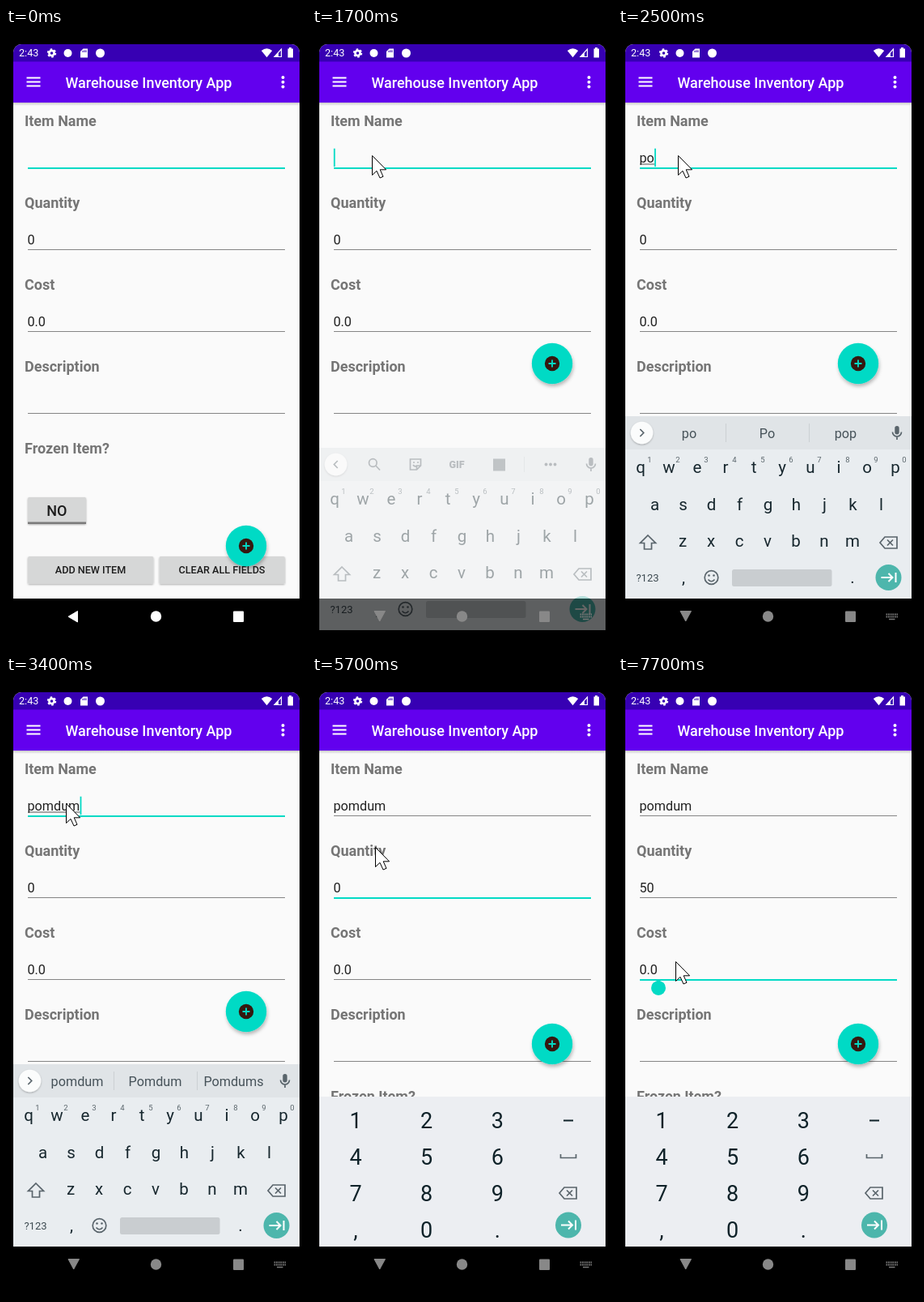
Animation, 371 px wide and 765 px high, one loop 8 s. Source, as an HTML page:

```html
<!DOCTYPE html>
<html lang="en">
<head>
<meta charset="utf-8">
<title>Inventory form</title>
<style>
  html, body { margin: 0; width: 100%; height: 100%; overflow: hidden; background: #000; }
  svg { display: block; width: 371px; height: 765px; font-family: Roboto, sans-serif; }
  .label { font-size: 18px; font-weight: 700; fill: #757575; }
  .value { font-size: 16.2px; fill: #212121; }
  .button { font-size: 12.6px; font-weight: 500; fill: #1c1c1c; }
  .mid { text-anchor: middle; }
  .key { font-size: 20.5px; fill: #17272e; }
  .hint { font-size: 9.5px; fill: #5c676d; }
  .digit { font-size: 27px; fill: #0f2229; }
  .word { font-size: 16.2px; fill: #465259; }
  .line { fill: none; stroke: #59646b; stroke-width: 1.7; }
</style>
</head>
<body>
<svg viewBox="0 0 371 765">
  <defs>
    <clipPath id="screen"><path d="M9 704V30a10 10 0 0 1 10-10H353a10 10 0 0 1 10 10V704Z"/></clipPath>
    <linearGradient id="fade" x2="0" y2="1">
      <stop stop-color="#000" stop-opacity=".2"/><stop offset="1" stop-color="#000" stop-opacity="0"/>
    </linearGradient>
    <filter id="lift" x="-30%" y="-30%" width="160%" height="170%">
      <feDropShadow dx="1" dy="3" stdDeviation="2" flood-opacity=".27"/>
    </filter>
    <filter id="low" x="-10%" y="-20%" width="120%" height="150%">
      <feDropShadow dx="0" dy="1" stdDeviation=".8" flood-opacity=".3"/>
    </filter>
    <g id="erase">
      <path class="line" d="M-11 0L-5-7H10V7H-5Z M-2-3.5L5 3.5M5-3.5L-2 3.5"/>
    </g>
    <g id="next">
      <circle r="16" fill="#4db6ac"/>
      <path d="M-9 0H5M0-5L5 0L0 5M9-6V6" fill="none" stroke="#fff" stroke-width="2"/>
    </g>
  </defs>

  <g clip-path="url(#screen)">
    <rect x="9" y="20" width="354" height="684" fill="#fafafa"/>
    <g id="form">
      <g id="fields"></g>
      <text class="label" x="23" y="525" id="frozen">Frozen Item?</text>
      <g id="actions">
        <rect x="27" y="579" width="72" height="33" rx="1.5" fill="#d6d7d7" filter="url(#low)"/>
        <rect x="27" y="609.5" width="72" height="2.5" fill="#7b7b7b"/>
        <text class="mid" x="62.8" y="602" font-size="18" font-weight="500" fill="#1c1c1c">NO</text>
        <g fill="#d6d7d7" filter="url(#low)">
          <rect x="27" y="652" width="155.5" height="34" rx="2"/>
          <rect x="189.500" y="652" width="155.5" height="34" rx="2"/>
        </g>
        <text class="button mid" x="104.5" y="673">ADD NEW ITEM</text>
        <text class="button mid" x="267" y="673">CLEAR ALL FIELDS</text>
      </g>
    </g>
    <path id="handle" d="M50 375L56.400 378.600A9 9 0 1 1 43.600 378.600Z" fill="#03dac5"/>
    <rect id="caret" width="1.8" height="22.5" fill="#03dac5"/>
    <g id="fab">
      <circle r="25.2" fill="#03dac5" filter="url(#lift)"/>
      <circle r="9.2" fill="#35180f"/>
      <path d="M-4.500 0H4.500M0-4.500V4.500" stroke="#03dac5" stroke-width="1.900"/>
    </g>

    <rect x="9" y="92" width="354" height="4" fill="url(#fade)"/>
    <rect x="9" y="41" width="354" height="51" fill="#6200ee"/>
    <rect x="9" y="20" width="354" height="21.500" fill="#3700b3"/>
    <g fill="#fff">
      <text x="16" y="35.300" font-size="12.600">2:43</text>
      <circle cx="56.500" cy="31" r="3.100" fill="none" stroke="#fff" stroke-width="2.600"/>
      <circle cx="56.500" cy="31" r="4.700" fill="none" stroke="#fff" stroke-width="2" stroke-dasharray="2.461"/>
      <circle cx="76.500" cy="31" r="5"/>
      <path d="M92 29L95.500 25.500H101V36.500H92Z"/>
      <path d="M95 27.800V30M97 27.300V30M99 27.300V30" stroke="#3700b3"/>
      <circle cx="116.500" cy="31" r="5.500"/>
      <path d="M315.800 28Q322.500 22.500 329.200 28L322.500 36.300Z"/>
      <path d="M332 35.500L340.500 26V35.500Z" fill="none" stroke="#fff" stroke-width="1.200"/>
      <path d="M331.500 36L337 30V36Z"/>
      <path d="M348.500 26V25.500H350V24H353V25.500H355V36.500H348.500Z"/>
      <path d="M25.500 60.500h17v2h-17zM25.500 65.500h17v2h-17zM25.500 70.500h17v2h-17z"/>
      <text x="73.500" y="74" font-size="18" font-weight="500">Warehouse Inventory App</text>
      <circle cx="342.500" cy="61" r="2"/><circle cx="342.500" cy="66.700" r="2"/><circle cx="342.500" cy="72.400" r="2"/>
    </g>
  </g>

  <g id="letters">
    <rect x="9" y="479" width="354" height="225" fill="#e9edf0"/>
    <rect x="9" y="479" width="354" height="41" fill="#e0e4e7"/>
    <circle cx="29.500" cy="499.500" r="13.800" fill="#fbfcfc" filter="url(#low)"/>
    <path id="chevron" class="line" d="M2.200-4.500L-2.200 0L2.200 4.500"/>
    <g id="tools">
      <circle class="line" cx="75.300" cy="497.500" r="4.800"/>
      <path class="line" d="M78.800 501L84 506.500"/>
      <path class="line" d="M121.500 493h13v8l-5 5h-8zM134.500 501h-5v5M125 500q2 3 5 1"/>
      <circle cx="126" cy="497" r="1" fill="#59646b"/><circle cx="131" cy="497" r="1" fill="#59646b"/>
      <text class="mid" x="179" y="504" font-size="12.500" font-weight="900" fill="#59646b">GIF</text>
      <rect x="224" y="492.500" width="15" height="15" fill="#6a757b"/>
      <path d="M262.500 490V509" stroke="#c5cbcf"/>
      <g fill="#59646b"><circle cx="289.500" cy="499.500" r="1.900"/><circle cx="295" cy="499.500" r="1.900"/><circle cx="300.500" cy="499.500" r="1.900"/></g>
    </g>
    <g id="words">
      <path d="M133.500 488V511M236.500 488V511" stroke="#cbd0d3"/>
      <text class="word mid" x="88" y="505.500"></text>
      <text class="word mid" x="184.500" y="505.500"></text>
      <text class="word mid" x="281.500" y="505.500"></text>
    </g>
    <rect x="342.300" y="491" width="5.400" height="10.500" rx="2.700" fill="#59646b"/>
    <path class="line" d="M339.500 498.500a5.500 5.500 0 0 0 11 0M345 504V508"/>
    <g id="keys"></g>
    <path class="line" d="M37 626L46.500 635.500H41.500V643H32.500V635.500H27.500Z"/>
    <use href="#erase" x="335" y="635"/>
    <text class="mid" x="36.500" y="683" font-size="13" fill="#3d4a51">?123</text>
    <text class="key mid" x="81" y="685">,</text>
    <circle class="line" cx="115.500" cy="678" r="8.300"/>
    <path class="line" d="M111.500 680.500q4 4.500 8 0"/>
    <circle cx="112.500" cy="675.500" r="1.300" fill="#59646b"/><circle cx="118.500" cy="675.500" r="1.300" fill="#59646b"/>
    <rect x="141" y="668" width="123.500" height="21" rx="2.500" fill="#c9cdd0"/>
    <text class="key mid" x="290" y="685">.</text>
    <use href="#next" x="334.500" y="678"/>
  </g>

  <g id="numbers">
    <rect x="9" y="519" width="354" height="185" fill="#eceef2"/>
    <g id="pad"></g>
    <path d="M311 548.500H323" stroke="#0f2229" stroke-width="2"/>
    <path class="line" d="M307.500 590V594.500H326.500V590"/>
    <use href="#erase" x="317" y="638"/>
    <use href="#next" x="317" y="677.500"/>
  </g>

  <g id="nav">
    <path id="back" d="M77 726.300L88.500 719.500V733Z" stroke-width="1" stroke-linejoin="round"/>
    <path id="down" d="M77 719.500H90.500L83.700 732Z" stroke-width="1" stroke-linejoin="round"/>
    <circle cx="185.500" cy="726" r="6.700"/>
    <rect x="281" y="719.500" width="13" height="13.500" rx="1"/>
    <g id="switch">
      <path d="M331.500 723.500H346M331.500 726.500H346" stroke="#777" stroke-width="1.800" stroke-dasharray="1.800 .8"/>
      <path d="M335 729.500H342.500" stroke="#777" stroke-width="1.500"/>
    </g>
  </g>

  <path id="mouse" d="M.5.5V24.500L6 19.300L10 28L14 26.300L10.200 17.800H17.600Z" fill="#fff" stroke="#000"/>
</svg>
<script>
const LOOP = 8000;
const $ = id => document.getElementById(id);
const make = (parent, tag, attrs, text = '') => {
  const el = document.createElementNS('http://www.w3.org/2000/svg', tag);
  for (const name in attrs) el.setAttribute(name, attrs[name]);
  el.textContent = text;
  return parent.appendChild(el);
};
const show = (el, on) => el.setAttribute('visibility', on ? 'visible' : 'hidden');
const move = (el, x, y) => el.setAttribute('transform', `translate(${x} ${y})`);

// Each row holds from its start time until the next one.
const at = (steps, t) => steps.reduce((row, next) => next[0] <= t ? next : row);

const fields = ['Item Name', 'Quantity', 'Cost', 'Description'].map((name, i) => {
  const y = 101 * i, box = $('fields');
  make(box, 'text', { class: 'label', x: 23, y: 121 + y }, name);
  return {
    line: make(box, 'rect', { x: 27, y: 172 + y, width: 318 }),
    value: make(box, 'text', { class: 'value', x: 26.5, y: 166 + y })
  };
});
const compose = make($('fields'), 'rect', { x: 27, y: 167.5, height: 1, fill: '#555' });

[['qwertyuiop', 28, 549], ['asdfghjkl', 45.5, 595], ['zxcvbnm', 80, 640]].forEach(([row, x, y], r) => {
  [...row].forEach((key, i) => {
    make($('keys'), 'text', { class: 'key mid', x: x + 35 * i, y }, key);
    if (!r) make($('keys'), 'text', { class: 'hint mid', x: x + 11 + 35 * i, y: 535.5 }, (i + 1) % 10);
  });
});
[...'123456789,0.'].forEach((key, i) => make($('pad'), 'text', {
  class: 'digit mid', x: 54 + 87.7 * (i % 3), y: 558 + 45 * Math.floor(i / 3)
}, key));
const words = [...$('words').querySelectorAll('text')];

const mousePath = [
  [0, -50, 0], [200, 20, 158], [300, 26, 150], [400, 34, 145], [500, 42, 143], [600, 50, 147],
  [700, 58, 154], [800, 65, 160], [900, 71, 164], [1000, 74, 157], [5200, 77, 167],
  [5700, 78, 211], [5800, 79, 255], [5900, 78, 298], [6000, 76, 329], [6100, 74, 345],
  [6300, 72, 350], [6400, 71, 352], [6600, 71, 353], [7500, 71, 352]
];
const typed = [[0, 0], [2200, 1], [2400, 2], [2700, 3], [3100, 4], [3200, 5], [3400, 6]];
const suggestions = [
  [0, ''], [2300, 'p P I'], [2500, 'po Po pop'], [2700, 'pom Pom Pom’s'], [3100, 'pomd Pomd Pomade'],
  [3200, 'pomdu Pomdu Pomade'], [3400, 'pomdum Pomdum Pomdums']
];
const focus = [[0, 0], [3900, 1], [7300, 2]];
const blink = [[0, 0], [1700, 1], [4400, 0], [5000, 1], [5400, 0], [5900, 1], [6600, 0], [7300, 1], [7700, 0]];
const slide = [[0, 39, 0], [1700, 39, .4], [1800, 3, .94], [1900, 0, 1]];
const fabY = [[0, 639], [1700, 414], [4100, 454]];
const navTone = [[0, 255], [1200, 252], [1300, 249], [1400, 246], [1500, 243], [1700, 136]];

function render(t) {
  const active = at(focus, t)[1];
  const open = t >= 1700, numeric = t >= 3900;
  const name = 'pomdum'.slice(0, at(typed, t)[1]);
  const values = [name, t < 6300 ? '0' : '50', '0.0', ''];
  fields.forEach(({ line, value }, i) => {
    value.textContent = values[i];
    line.setAttribute('height', i === active ? 2 : 1);
    line.setAttribute('fill', i === active ? '#03dac5' : '#858585');
  });

  const nameWidth = name ? fields[0].value.getComputedTextLength() : 0;
  compose.setAttribute('width', numeric ? 0 : nameWidth);
  const caretX = [26.8 + nameWidth, t < 6300 ? 26.8 : 35.5, 49.3][active];
  move($('caret'), caretX, 148.7 + 101 * active);
  show($('caret'), at(blink, t)[1]);
  show($('handle'), t >= 7500);
  show($('actions'), !open);
  show($('frozen'), !open || t >= 4100);
  move($('fab'), 297, at(fabY, t)[1]);

  const [, drop, alpha] = at(slide, t);
  move($('letters'), 0, drop);
  $('letters').setAttribute('opacity', alpha);
  $('letters').style.display = open && !numeric ? '' : 'none';
  $('numbers').style.display = numeric ? '' : 'none';
  const list = at(suggestions, t)[1].split(' ');
  const typing = t >= 2200;
  words.forEach((el, i) => { el.textContent = list[i] || ''; });
  show($('tools'), !typing);
  show($('words'), typing);
  $('chevron').setAttribute('transform', `translate(29.5 499.5) scale(${typing ? -1 : 1} 1)`);

  const tone = at(navTone, t)[1], color = `rgb(${tone},${tone},${tone})`;
  $('nav').setAttribute('fill', color);
  $('nav').setAttribute('stroke', 'none');
  for (const id of ['back', 'down']) $(id).setAttribute('stroke', color);
  show($('back'), !open);
  show($('down'), open);
  show($('switch'), open);

  const [, x, y] = at(mousePath, t);
  move($('mouse'), x, y);
}

const start = performance.now();
function tick() {
  render((performance.now() - start) % LOOP);
  requestAnimationFrame(tick);
}
tick();
</script>
</body>
</html>
```
